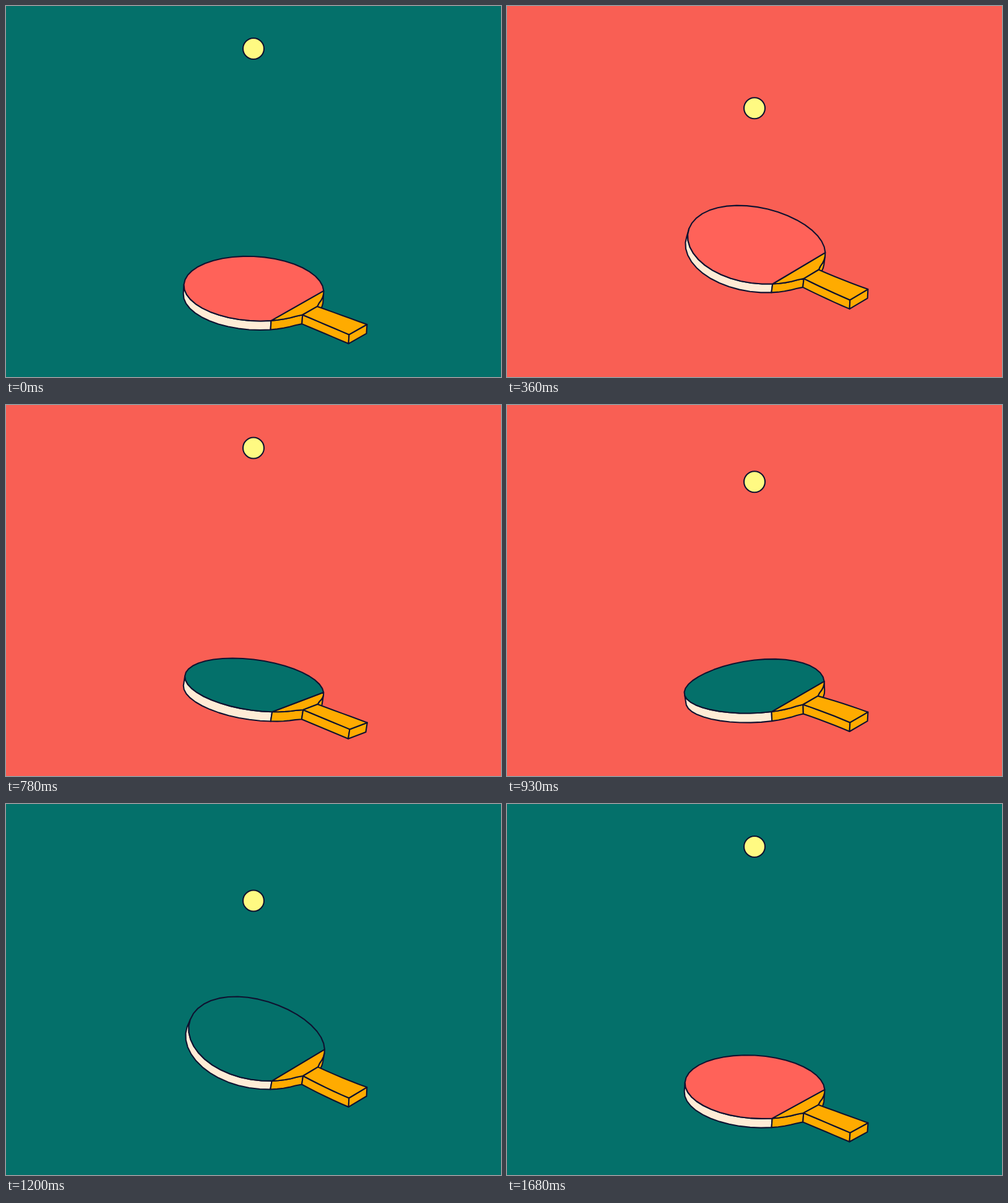
An HTML page with a canvas that plays this animation: 800 by 600 pixels, repeating every 1710 ms.

```html
<!DOCTYPE html>
<html lang="en">
<head>
<meta charset="utf-8">
<title>Paddle and ball</title>
<style>
  html, body { margin: 0; width: 100%; height: 100%; overflow: hidden; background: #04706a; }
  canvas { display: block; }
</style>
</head>
<body>
<canvas id="stage" width="800" height="600"></canvas>
<script>
const ctx = document.getElementById('stage').getContext('2d');

const LOOP = 1710, STEP = 30;
const HITS = [231, 1052];
const INK = '#0f1230', WOOD = '#ffab00', CREAM = '#ffecd6', BALL = '#fffa82';
const RED = { floor: '#f95f54', rubber: '#ff6259' };
const TEAL = { floor: '#04706a', rubber: '#04706a' };

// Screen projections of the paddle's axis, width and normal, per disc radius
const U = [90.2, 35.4], V = [68.1, -40], N = [4.7, -93];
const HALF = 0.078;       // half thickness
const TIP = 1.868;        // handle end along the axis
const TIP_WIDTH = 0.213;
const CHORD = 0.674;      // angle where the rubber stops
const NECK = 0.177;       // angle where the handle starts
const NECK_END = [1.006, 0.176];

const mix = (a, b, k) => a + (b - a) * k;
function ease(t, from, to) {
  const x = Math.min(1, Math.max(0, (t - from) / (to - from)));
  return 0.5 - 0.5 * Math.cos(Math.PI * x);
}

function line(a, b, n) {
  return Array.from({ length: n + 1 }, (_, i) => [mix(a[0], b[0], i / n), mix(a[1], b[1], i / n)]);
}
function arc(from, to, n) {
  return Array.from({ length: n + 1 }, (_, i) => {
    const a = mix(from, to, i / n);
    return [Math.cos(a), Math.sin(a)];
  });
}
const mirror = points => points.map(([u, v]) => [u, -v]).reverse();

const farArc = [NECK_END, ...arc(NECK, CHORD, 5).slice(1)];
const padArc = arc(CHORD, 2 * Math.PI - CHORD, 32);
const nearArc = mirror(farArc);
const farSide = line([TIP, TIP_WIDTH], NECK_END, 6);
const nearSide = mirror(farSide);
const endSide = line([TIP, -TIP_WIDTH], [TIP, TIP_WIDTH], 1);

const sides = [
  [padArc, CREAM], [farArc, WOOD], [nearArc, WOOD],
  [nearSide, WOOD], [farSide, WOOD], [endSide, WOOD]
];

function paint(points, fill) {
  ctx.beginPath();
  points.forEach(p => ctx.lineTo(p[0], p[1]));
  ctx.closePath();
  ctx.fillStyle = fill;
  ctx.fill();
  ctx.stroke();
}

function area(points) {
  return points.reduce((sum, p, i) => {
    const q = points[(i + 1) % points.length];
    return sum + p[0] * q[1] - p[1] * q[0];
  }, 0);
}

// Rolls around the handle axis, then bends the whole paddle away from the handle end
function projector(y, roll, bend) {
  const k = Math.abs(bend) < 1e-5 ? 1e-5 : bend;
  const c = Math.cos(roll), s = Math.sin(roll);
  return n => ([u, v]) => {
    const w = v * c - n * s, h = v * s + n * c;
    const phi = k * (TIP - u);
    const along = -Math.sin(phi) / k - h * Math.sin(phi);
    const lift = -(1 - Math.cos(phi)) / k + h * Math.cos(phi);
    return [
      568.5 + along * U[0] + w * V[0] + lift * N[0],
      y + 66 + along * U[1] + w * V[1] + lift * N[1]
    ];
  };
}

function drawSide(points, fill, top, bottom) {
  const a = points.map(top), b = points.map(bottom);
  let start = -1;
  for (let i = 0; i < a.length; i++) {
    const seen = i < a.length - 1 && area([b[i], b[i + 1], a[i + 1], a[i]]) < 0;
    if (seen && start < 0) start = i;
    if (!seen && start >= 0) {
      paint([...a.slice(start, i + 1), ...b.slice(start, i + 1).reverse()], fill);
      start = -1;
    }
  }
}

function drawPaddle(y, roll, bend, up, down) {
  const at = projector(y, roll, bend);
  const top = at(HALF), bottom = at(-HALF);
  sides.forEach(([points, fill]) => drawSide(points, fill, top, bottom));

  const showTop = area(padArc.map(top)) < 0;
  const face = showTop ? top : bottom;
  paint([...nearArc, ...farArc].map(face), WOOD);
  paint([...nearSide, ...farSide].map(face), WOOD);
  paint(padArc.map(face), (showTop ? up : down).rubber);
}

function ballY(since, until) {
  if (until < 235) return 69 + 345 * Math.pow(1 - until / 235, 2.5);
  const x = Math.max(0, 1 - since / 580);
  return 69 + 156 * x * x + 189 * Math.exp(-since / 28);
}

function draw(time) {
  const redTurn = time >= HITS[0] && time < HITS[1];
  const last = redTurn ? HITS[0] : HITS[1];
  const next = redTurn ? HITS[1] : HITS[0];
  const since = (time - last + LOOP) % LOOP;
  const until = (next - time + LOOP) % LOOP;
  const t = until < 250 ? -until : since;
  const [up, down] = redTurn ? [RED, TEAL] : [TEAL, RED];

  const y = 465 - 57 * (ease(t, -250, 80) - ease(t, 220, 620));
  const bend = 0.19 * ease(t, -230, -10) - 0.345 * ease(t, -10, 190) + 0.155 * ease(t, 190, 370);
  const roll = Math.PI / (1 + Math.exp(-0.0216 * (since - 412)));

  ctx.fillStyle = up.floor;
  ctx.fillRect(0, 0, 800, 600);
  ctx.strokeStyle = INK;
  ctx.lineWidth = 2.1;
  ctx.lineJoin = 'round';
  drawPaddle(y, roll, bend, up, down);

  ctx.beginPath();
  ctx.arc(400, ballY(since, until), 17, 0, 2 * Math.PI);
  ctx.fillStyle = BALL;
  ctx.fill();
  ctx.stroke();
}

const begin = performance.now();
function tick() {
  const time = (performance.now() - begin) % LOOP;
  draw(Math.floor(time / STEP) * STEP);
  requestAnimationFrame(tick);
}
tick();
</script>
</body>
</html>
```
